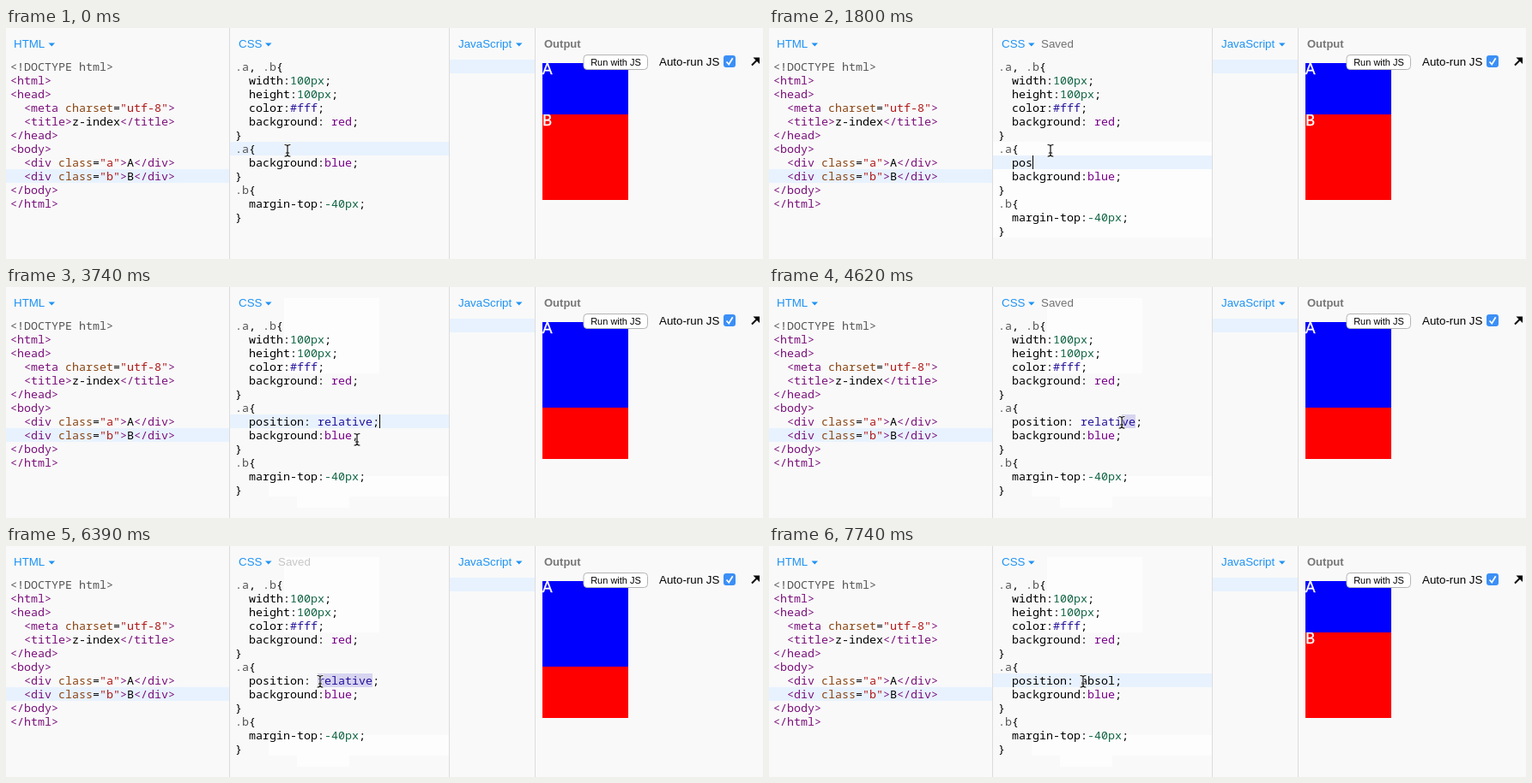
An HTML page that plays this animation: 882 px wide and 270 px high, repeating every 8 s.

```html
<!DOCTYPE html>
<html>
<head>
<meta charset="utf-8">
<title>Position demo</title>
<style>
  html, body { margin: 0; width: 100%; height: 100%; overflow: hidden; background: #f9f9f9; }
  svg { display: block; width: 882px; height: 270px; }
  text { white-space: pre; font: 13.333px "Liberation Sans", Arial, sans-serif; }
  .code text { font: 500 13.333px "Noto Sans Mono", monospace; fill: #000; }
  .title { fill: #1e93f5; }
  .output { font-weight: bold; font-size: 13px; fill: #777; }
  .button { font-size: 11px; text-anchor: middle; }
  .page text { font: 17px Lato, sans-serif; fill: #fff; stroke: #fff; stroke-width: .4; }
  .meta { fill: #555; }
  .tag { fill: #7a0f7a; }
  .attr { fill: #8a4513; }
  .str { fill: #b01515; }
  .num { fill: #116644; }
  .atom { fill: #221199; }
  .key { fill: #770088; }
</style>
</head>
<body>
<svg viewBox="0 0 882 270" xmlns="http://www.w3.org/2000/svg">
  <rect width="882" height="270" fill="#f9f9f9"/>
  <g fill="#fdfdfd">
    <path id="bodyGlow" d="M261 133H516V245H261z"/>
    <path id="headGlow" d="M324 13H435V101H324z"/>
    <path id="footGlow" d="M306 221H516V245H400V258H339V245H306z"/>
  </g>
  <g fill="#e8f2ff">
    <rect y="165" width="260" height="16"/>
    <rect x="517" y="37" width="99" height="16"/>
    <rect id="active" x="261" width="255" height="16"/>
  </g>
  <rect id="selection" y="149" height="16" fill="#d7d4f0"/>
  <path d="M260.5 0V270M516.5 0V270M616.5 0V270" stroke="#dcdcdc"/>
  <g class="title" id="titles"></g>
  <text id="saved" x="317" y="23">Saved</text>
  <text class="output" x="627" y="23">Output</text>
  <g class="code" id="html"></g>
  <g class="code" id="css"></g>
  <rect id="caret" y="149" width="1" height="16"/>

  <g class="page">
    <rect x="625" y="101" width="100" height="100" fill="#f00"/>
    <text x="625" y="114">B</text>
    <rect id="boxA" x="625" y="41" width="100" fill="#00f"/>
    <text x="625" y="54">A</text>
  </g>

  <rect x="673" y="31.5" width="74.5" height="17" rx="4" fill="#fff" stroke="#b4b4b4"/>
  <text class="button" x="710.5" y="44">Run with JS</text>
  <text x="761" y="44">Auto-run JS</text>
  <rect x="836" y="32" width="14" height="14" rx="3" fill="#3b8ff6"/>
  <path d="M839.5 39.5l2.7 3 4.5-7.3" fill="none" stroke="#fff" stroke-width="1.7"/>
  <path d="M869 43.5l6-6" stroke="#000" stroke-width="2"/>
  <path d="M870.5 34.5H878V42z"/>

  <defs>
    <path id="beam" d="M-3-6.5Q0-6.5 0-4.5V5Q0 7 -3 7M3-6.5Q0-6.5 0-4.5M0 5Q0 7 3 7M-1.7 3H1.7"/>
  </defs>
  <g id="pointer" fill="none" stroke-linecap="round">
    <use href="#beam" stroke="#fff" stroke-width="2.6"/>
    <use href="#beam" stroke="#111" stroke-width="1.2"/>
  </g>
</svg>
<script>
const LOOP = 8000, CHAR = 8, LINE = 16, CSS_X = 267, INDENT = 2, BLINK = 525;

// Moments of the story, in ms.
const NEWLINE = 450, TYPE = 1650, TYPED = 2090, COMPLETE = 2690, APPLY = 2990,
  RESAVED = 4180, DRAG = 4330, DROP = 5200, RETYPE = 6540, REVERT = 6840, RETYPED = 7140;

const $ = id => document.getElementById(id);
const set = (id, attrs) => {
  for (const key in attrs) $(id).setAttribute(key, attrs[key]);
};
const show = (id, visible) => set(id, { opacity: +visible });
const during = (t, from, to) => t >= from && t < to;
const clamp = v => Math.min(1, Math.max(0, v));
const escape = s => s.replace(/&/g, '&amp;').replace(/</g, '&lt;');

// Named groups in a pattern become the classes of the coloured spans.
function colour(line, pattern) {
  let out = '', end = 0;
  for (const m of line.matchAll(pattern)) {
    const kind = Object.keys(m.groups).find(k => m.groups[k]);
    out += escape(line.slice(end, m.index)) + `<tspan class="${kind}">${escape(m[0])}</tspan>`;
    end = m.index + m[0].length;
  }
  return out + escape(line.slice(end));
}
const showCode = (id, x, lines, pattern) => {
  $(id).innerHTML = lines.map((line, i) =>
    `<text x="${x}" y="${50 + i * LINE}">${colour(line, pattern)}</text>`).join('');
};

const htmlPattern = /(?<meta><!.*>)|(?<tag><\/?\w+|>)|(?<attr>\w+(?==))|(?<str>"[^"]*")/g;
const cssPattern = /(?<meta>\.[ab])|(?<num>-?\d+px)|(?<atom>#fff|relative)|(?<key>\b(?:red|blue)\b)/g;

showCode('html', 5, [
  '<!DOCTYPE html>', '<html>', '<head>', '  <meta charset="utf-8">',
  '  <title>z-index</title>', '</head>', '<body>', '  <div class="a">A</div>',
  '  <div class="b">B</div>', '</body>', '</html>'
], htmlPattern);

const cssHead = ['.a, .b{', '  width:100px;', '  height:100px;', '  color:#fff;',
  '  background: red;', '}', '.a{'];
const cssTail = ['  background:blue;', '}', '.b{', '  margin-top:-40px;', '}'];

const title = (name, x, arrow) =>
  `<text x="${x}" y="23">${name}</text><path d="M${arrow} 17.5h7.5l-3.75 4z"/>`;
$('titles').innerHTML =
  title('HTML', 9, 49.5) + title('CSS', 271, 302) + title('JavaScript', 527, 594);

// The first `ready` letters stand at `from`, the last one at `to`.
const typing = (word, t, from, to, ready = 1) => t < from ? '' :
  word.slice(0, ready + Math.floor(clamp((t - from) / (to - from)) * (word.length - ready)));

function newLine(t) {
  if (t < NEWLINE) return null;
  if (t < COMPLETE) return typing('position', t, TYPE, TYPED);
  if (t < RETYPE) return 'position: relative;';
  return `position: ${typing('absol', t, RETYPE, RETYPED, 2)};`;
}

// The caret stays lit during a burst of keys and blinks after it.
const bursts = [[NEWLINE, NEWLINE], [TYPE, TYPED], [COMPLETE, COMPLETE], [RETYPE, RETYPED]];
function caretLit(t) {
  const burst = bursts.findLast(([from]) => t >= from);
  return !!burst && Math.max(0, t - burst[1]) % (2 * BLINK) < BLINK;
}

const route = [
  { t: APPLY, x: 328, y: 143 }, { t: 3440, x: 368, y: 250 }, { t: 3740, x: 409, y: 178 },
  { t: RESAVED, x: 427, y: 159 }, { t: DRAG, x: 427, y: 158 }, { t: DROP, x: 366, y: 158 }
];
function pointerAt(t) {
  const next = route.findIndex(p => p.t > t);
  if (next < 1) return next ? route.at(-1) : route[0];
  const a = route[next - 1], b = route[next];
  const u = (t - a.t) / (b.t - a.t), ease = u * u * (3 - 2 * u);
  return { x: a.x + (b.x - a.x) * ease, y: a.y + (b.y - a.y) * ease };
}

function savedOpacity(t) {
  if (during(t, TYPE, COMPLETE)) return .55;
  return t < RESAVED ? 0 : .55 * clamp((RETYPE - t) / 390);
}

let shown;
function render(t) {
  const text = newLine(t), open = text !== null;
  if (text !== shown) {
    shown = text;
    showCode('css', CSS_X, [...cssHead, ...(open ? ['  ' + text] : []), ...cssTail], cssPattern);
  }

  const { x, y } = pointerAt(t), selecting = during(t, DRAG, RETYPE);
  set('pointer', { transform: `translate(${x} ${y})` });

  // The drag runs leftwards from the semicolon and follows the pointer.
  const end = INDENT + 'position: relative'.length;
  const start = Math.min(end, Math.ceil((x - CSS_X) / CHAR - .65));
  set('selection', { x: CSS_X + start * CHAR, width: (end - start) * CHAR });
  show('selection', selecting);
  set('active', { y: open ? 149 : 133 });
  show('active', !selecting);

  const column = open ? INDENT + text.length - (t >= RETYPE) : 0;
  set('caret', { x: CSS_X + column * CHAR });
  show('caret', !selecting && caretLit(t));

  set('saved', { opacity: savedOpacity(t) });
  set('boxA', { height: during(t, APPLY, REVERT) ? 100 : 60 });
  show('bodyGlow', during(t, NEWLINE, APPLY));
  show('headGlow', t >= COMPLETE);
  show('footGlow', t >= APPLY);
}

const begin = performance.now();
function tick() {
  render((performance.now() - begin) % LOOP);
  requestAnimationFrame(tick);
}
tick();
</script>
</body>
</html>
```
